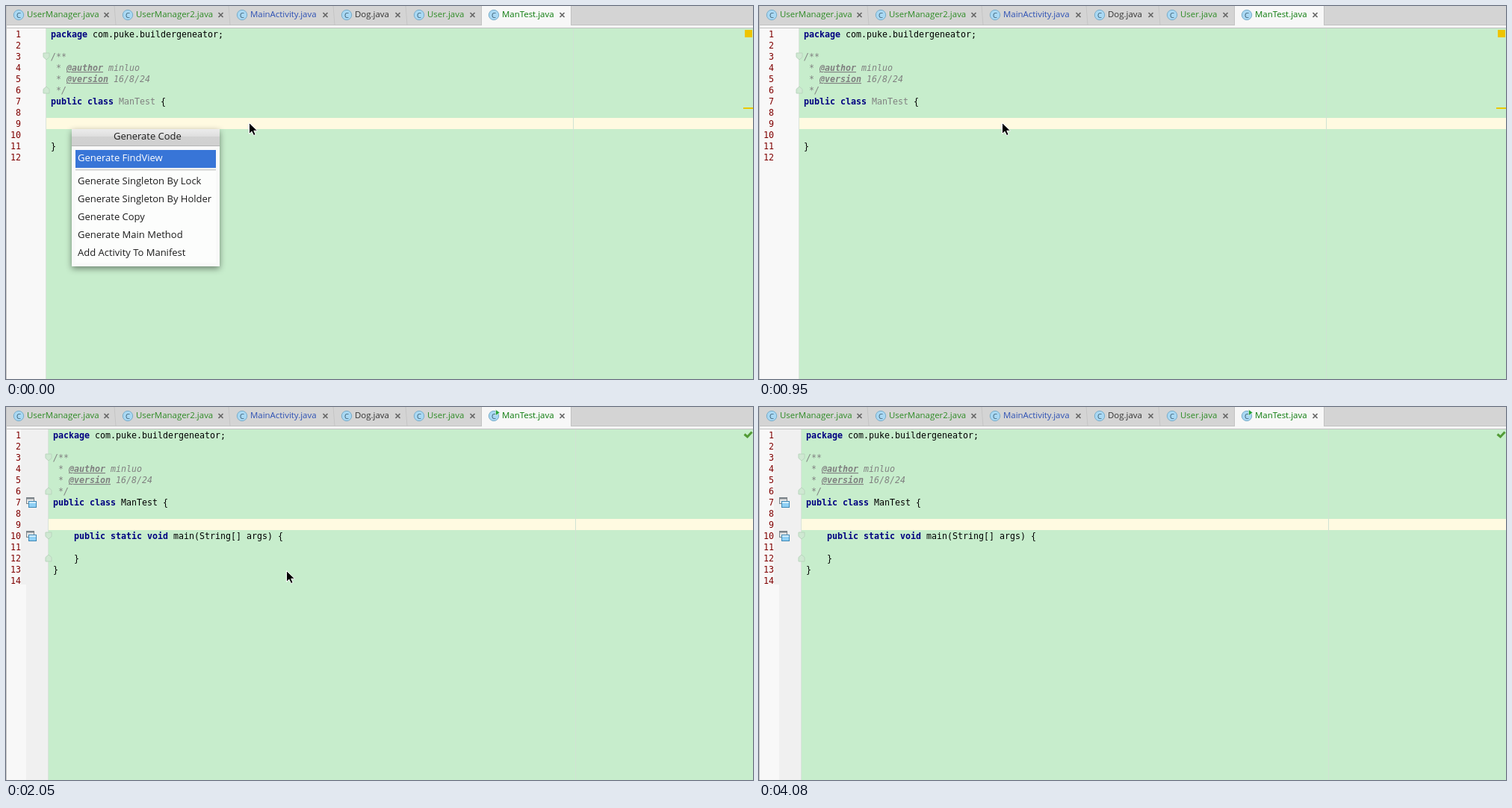
Write an HTML page that moves like this. It is 1000x500 px and loops after 4530 ms.

```html
<!DOCTYPE html>
<html lang="en">
<head>
<meta charset="utf-8">
<title>Generate main method</title>
<style>
html, body { margin: 0; width: 100%; height: 100%; overflow: hidden; background: #c7edcc; }
svg { display: block; width: 1000px; height: 500px; }
text { white-space: pre; }
.code { font: 11.63px "DejaVu Sans Mono", monospace; fill: #000; }
.kw { font-weight: bold; fill: #000080; }
.doc { font-style: italic; fill: #808080; }
.tag { font-style: italic; font-weight: bold; fill: #808080; text-decoration: underline; }
.dim { fill: #808080; }
.num { fill: #800000; text-anchor: end; }
.tab { font: 11.45px "Open Sans", sans-serif; }
.item { font: 13px "Open Sans", sans-serif; fill: #1c1c1c; }
.badge { font: 9.5px "Open Sans", sans-serif; fill: #35566b; text-anchor: middle; }
</style>
</head>
<body>
<svg id="stage" viewBox="0 0 1000 500">
  <defs>
    <linearGradient id="title" x2="0" y2="1">
      <stop offset="0" stop-color="#ececec"/><stop offset=".45" stop-color="#dedede"/>
      <stop offset=".46" stop-color="#d2d2d2"/><stop offset="1" stop-color="#d0d0d0"/>
    </linearGradient>
    <filter id="shadow" x="-20%" y="-20%" width="140%" height="140%">
      <feDropShadow dx="0" dy="3" stdDeviation="4" flood-opacity=".45"/>
    </filter>
  </defs>
  <rect width="1000" height="500" fill="#c7edcc"/>
  <rect id="gutter" y="30" height="470" fill="#f8f8f8"/>
  <g id="shade" fill="#f0f0f0"></g>
  <g id="shift">
    <rect x="54" y="150" width="950" height="15" fill="#fffae1"/>
    <path d="M53.5 30V500" stroke="#d9e3da"/>
    <path d="M759.5 30V500" stroke="#d0e2d3"/>
    <g id="code"></g>
    <g id="before"></g>
    <g id="after"></g>
    <g id="folds"></g>
    <rect id="caret" x="88" y="150" width="2" height="15"/>
  </g>
  <g id="numbers"></g>
  <g id="runs"></g>
  <g id="marks">
    <rect id="warn" x="989" y="32" width="10" height="10" fill="#eec400"/>
    <rect id="stripe" x="987" y="136" width="13" height="2" fill="#ebc700"/>
    <g id="eye">
      <path d="M988 37.5Q994 30.5 1000 37.5Q994 43.5 988 37.5Z" fill="#dfeae0" stroke="#7b837c" stroke-width="1.3"/>
      <circle cx="994" cy="37" r="2.7" fill="#6c716d"/>
    </g>
    <path id="check" d="M988.5 36.5L992.5 40L998.5 33.5" fill="none" stroke="#529b35" stroke-width="3"/>
  </g>
  <g id="tabs"></g>
  <path d="M.5 0V500" stroke="#c3c3c3"/>
  <g id="popup">
    <rect x="88" y="165" width="198" height="184" fill="#f9f9f9" filter="url(#shadow)"/>
    <rect x="88" y="165" width="198" height="22" fill="url(#title)"/>
    <path d="M88 187.5H286" stroke="#b4b4b4"/>
    <rect x="93" y="193" width="188" height="151" fill="#fcfdfc"/>
    <path d="M93 219.5H281" stroke="#d2d2d2" stroke-width="2"/>
    <text class="item" x="144" y="179">Generate Code</text>
    <rect id="pick" x="93" width="188" height="24" fill="#3875d7"/>
    <g id="items"></g>
  </g>
  <path id="mouse" d="M.5 .5V15.5L4 12.2L6.6 17.6L9.2 16.4L6.8 11.2H11.6Z" stroke="#fff" stroke-width="1" stroke-linejoin="round"/>
</svg>
<script>
const LOOP = 4530;
const $ = id => document.getElementById(id);
const show = (id, on) => $(id).setAttribute("display", on ? "inline" : "none");
const put = (id, html) => { $(id).innerHTML = html; };

const rowY = n => 42 + 15 * (n - 1);
const span = ([text, cls]) => `<tspan${cls ? ` class="${cls}"` : ""}>${text}</tspan>`;
const line = (row, col, ...parts) =>
  `<text class="code" x="${60 + col * 7}" y="${rowY(row)}">${parts.map(span).join("")}</text>`;

put("code",
  line(1, 0, ["package", "kw"], [" com.puke.buildergeneator;"]) +
  line(3, 0, ["/**", "doc"]) +
  line(4, 1, ["* ", "doc"], ["@author", "tag"], [" minluo", "doc"]) +
  line(5, 1, ["* ", "doc"], ["@version", "tag"], [" 16/8/24", "doc"]) +
  line(6, 1, ["*/", "doc"]) +
  line(7, 0, ["public class ", "kw"]) +
  line(7, 13, ["ManTest"]).replace("<text", '<text id="cls"') +
  line(7, 21, ["{"]));
put("before", line(11, 0, ["}"]));
put("after",
  line(10, 4, ["public static void", "kw"], [" main(String[] args) {"]) +
  line(12, 4, ["}"]) + line(13, 0, ["}"]));

// Fold handles: a small shield, flipped for the closing end
const fold = (row, flip) =>
  `<path transform="translate(54 ${rowY(row) - 4.5}) scale(1 ${flip})" d="M-4 -4.5H4V1L0 4.5L-4 1Z" fill="#cfe8d2" stroke="#b9d5bd"/>`;
$("code").innerHTML += fold(3, 1) + fold(6, -1);
put("folds", fold(10, 1) + fold(12, -1));

put("numbers", Array.from({ length: 14 }, (_, i) =>
  `<text class="code num" x="20" y="${rowY(i + 1)}">${i + 1}</text>`).join(""));

put("shade", '<rect x="20" y="30" width="33" height="208"/><rect id="full" x="27" y="30" width="29" height="470"/>');

const runIcon = y => `<g transform="translate(27 ${y})">
  <rect x=".5" y=".5" width="10" height="8" fill="#e6e6e6" stroke="#7d858a"/><path d="M0 1.5H11" stroke="#7d858a" stroke-width="2"/>
  <rect x="3.5" y="5.5" width="10" height="8" fill="#8fd0f5" stroke="#3d87b5"/><path d="M4 7H13" stroke="#e9f7ff" stroke-width="1.5"/></g>`;
put("runs", runIcon(121) + runIcon(166));

// Name, icon centre, close-button centre, colour
const tabs = [
  ["UserManager.java", 17, 134.5, "#2d8b24"],
  ["UserManager2.java", 163, 287.5, "#2d8b24"],
  ["MainActivity.java", 316, 427.5, "#2c50b4"],
  ["Dog.java", 456, 524.5, "#333"],
  ["User.java", 553, 624.5, "#2d8b24"],
  ["ManTest.java", 653, 744.5, "#0a7a0a"]
];
const tab = ([name, x, close, color]) => `
  <circle cx="${x}" cy="12" r="6.7" fill="#a9d8f3" stroke="#78acc9"/>
  <text class="badge" x="${x}" y="15.5">C</text>
  <text class="tab" x="${x + 11}" y="15.3" fill="${color}">${name}</text>
  <path d="M${close - 3} 9l6 6m0 -6l-6 6" stroke="#666" stroke-width="1.7"/>`;
put("tabs", `
  <rect width="1000" height="26" fill="#d4d4d4"/>
  <rect y="26" width="1000" height="4" fill="#f5f5f5"/>
  <path d="M0 25.5H1000M0 29.5H1000" stroke="#c2c2c2"/>
  ${[146, 299, 439, 536].map(x => `<path d="M${x - 1} 0L${x + 1} 25" stroke="#c5c5c5"/>`).join("")}
  <rect x="637" width="119" height="28" fill="#f7f7f7"/>
  <path d="M636.5 0V25M756.5 0V25" stroke="#c2c2c2"/>
  ${tabs.map(tab).join("")}
  <path id="play" d="M655.5 3.5L661 7.5L655.5 11.5Z" fill="#24a33a" stroke="#f7f7f7" stroke-width=".6"/>`);

const items = ["Generate FindView", "Generate Singleton By Lock", "Generate Singleton By Holder",
  "Generate Copy", "Generate Main Method", "Add Activity To Manifest"];
const itemTop = i => i ? 200 + 24 * i : 193;
put("items", items.map((s, i) => `<text class="item" x="96" y="${itemTop(i) + 15}">${s}</text>`).join(""));

// Pointer positions: time, x, y
const moves = [[0, 325, 156], [1580, 329, 161], [1700, 342, 178], [1820, 358, 199],
  [1940, 371, 213], [2050, 375, 219], [3010, 388, 221], [3130, 784, 482]];

function draw(t) {
  const inserted = t >= 1070, indexed = t >= 1430, checked = t >= 1580;
  const dx = checked ? 3 : 0;

  show("popup", t < 950);
  const sel = t < 120 ? 0 : t < 240 ? 5 : 4;
  $("pick").setAttribute("y", itemTop(sel));
  [...$("items").children].forEach((el, i) => { el.style.fill = i === sel ? "#fff" : ""; });

  $("shift").setAttribute("transform", `translate(${dx})`);
  $("gutter").setAttribute("width", 53 + dx);
  show("shade", inserted);
  show("full", checked);
  show("before", !inserted);
  show("after", inserted);
  show("folds", indexed);
  show("play", indexed);
  show("runs", checked);
  $("cls").setAttribute("class", checked ? "code" : "code dim");
  [...$("numbers").children].slice(12).forEach(el => el.setAttribute("display", inserted ? "inline" : "none"));

  show("warn", !inserted);
  show("eye", inserted && !checked);
  show("stripe", !checked);
  show("check", checked);

  show("caret", (t >= 1070 && t < 2050) || (t >= 2530 && t < 3130) || (t >= 3600 && t < 4080));

  const [, x, y] = moves.filter(m => m[0] <= t).pop();
  $("mouse").setAttribute("transform", `translate(${x} ${y})`);
  show("mouse", t < 3370);
}

function tick() {
  draw(performance.now() % LOOP);
  requestAnimationFrame(tick);
}
draw(0);
requestAnimationFrame(tick);
</script>
</body>
</html>
```
